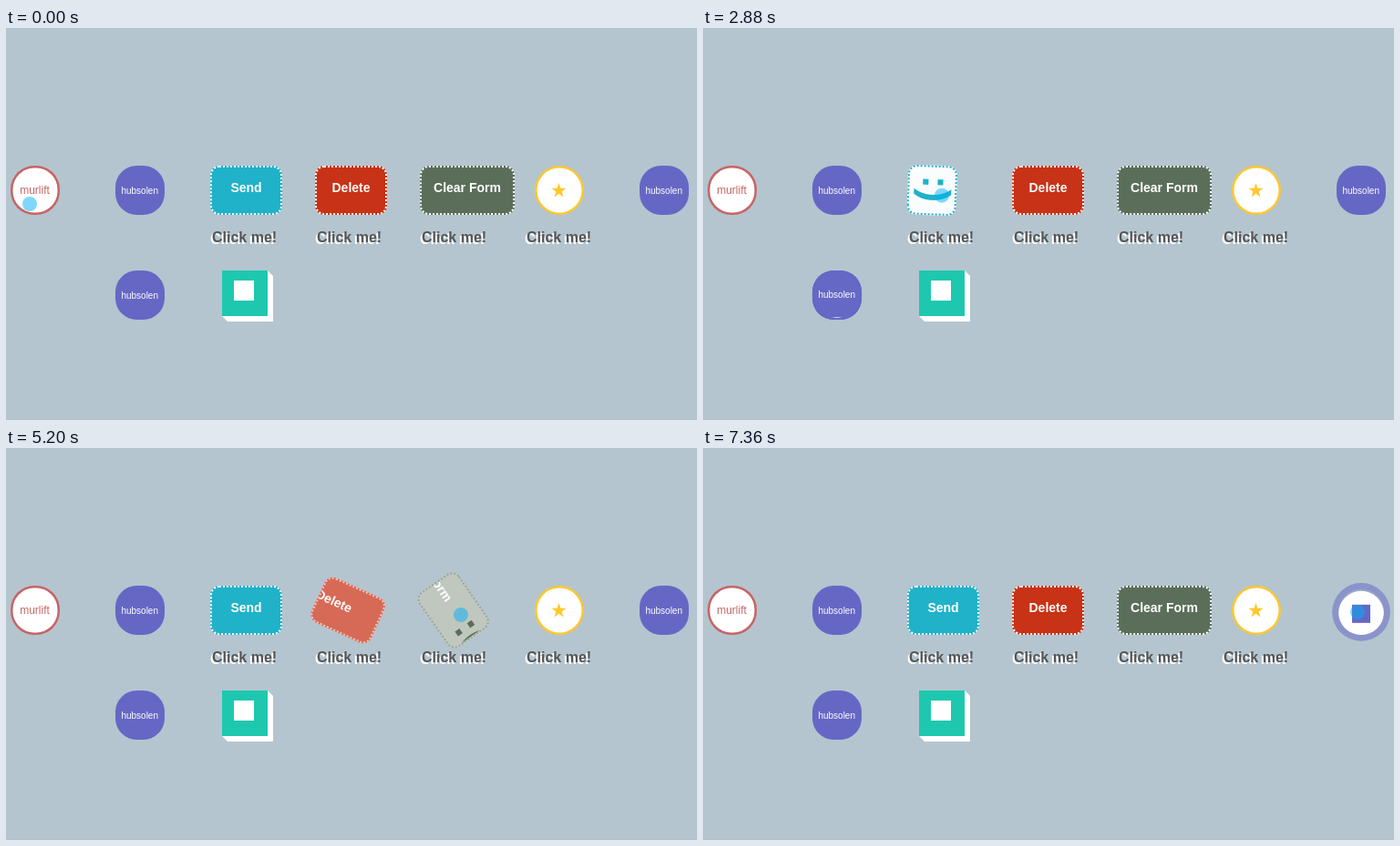
These frames come from a looping animation (758x430 px, 8560 ms). An HTML page with a canvas:

```html
<!DOCTYPE html>
<html lang="en">
<head>
<meta charset="utf-8">
<title>Button hover effects</title>
<style>
  html, body { margin: 0; width: 100%; height: 100%; overflow: hidden; background: #b4c5cf; }
  canvas { display: block; }
</style>
</head>
<body>
<canvas id="stage" width="758" height="430"></canvas>
<script>
const ctx = document.getElementById('stage').getContext('2d');
const LOOP = 8560, STEP = 80;
const SANS = '"Liberation Sans", Arial, sans-serif';
const WHITE = [255, 255, 255], PURPLE = [102, 103, 197], RED = [199, 100, 100],
      GOLD = [255, 200, 45], TEAL = [30, 200, 175];

const lerp = (a, b, p) => a + (b - a) * p;
const clamp = x => Math.max(0, Math.min(1, x));
const rgb = (c, a = 1) => `rgba(${c.map(Math.round).join()},${a})`;
const mix = (a, b, p) => a.map((v, i) => lerp(v, b[i], p));

// The CSS "ease" curve: cubic-bezier(.25, .1, .25, 1)
function ease(x) {
  if (x <= 0) return 0;
  if (x >= 1) return 1;
  let lo = 0, hi = 1, u = 0.5;
  for (let i = 0; i < 20; i++) {
    u = (lo + hi) / 2;
    const bx = 0.75 * u * (1 - u) + u ** 3;
    if (bx < x) lo = u; else hi = u;
  }
  return 0.3 * u * (1 - u) ** 2 + 3 * u * u * (1 - u) + u ** 3;
}

// Hover amount: rises after `enter`, falls after `leave`
const hover = (t, enter, leave, inMs = 600, outMs = inMs) =>
  t < leave ? ease((t - enter) / inMs) : 1 - ease((t - leave) / outMs);

function text(str, x, y, size, color, align = 'center', weight = '') {
  ctx.font = `${weight} ${size}px ${SANS}`;
  ctx.textAlign = align;
  ctx.fillStyle = color;
  ctx.fillText(str, x, y);
}

function box(x, y, w, h, r) {
  ctx.beginPath();
  ctx.roundRect(x, y, w, h, r);
}

function fillBox(x, y, w, h, r, color) {
  box(x, y, w, h, r);
  ctx.fillStyle = color;
  ctx.fill();
}

function disc(x, y, r, color) {
  ctx.beginPath();
  ctx.arc(x, y, r, 0, Math.PI * 2);
  ctx.fillStyle = color;
  ctx.fill();
}

function square(x, y, size, color) {
  ctx.fillStyle = color;
  ctx.fillRect(x - size / 2, y - size / 2, size, size);
}

function polygon(points, color) {
  ctx.beginPath();
  points.forEach(([x, y]) => ctx.lineTo(x, y));
  ctx.fillStyle = color;
  ctx.fill();
}

// Round button that widens into a bar
function pill(x, w, r, color, p) {
  fillBox(x, 151, w, 54, r, rgb(color));
  fillBox(x + 2.5, 153.5, w - 5, 49, Math.max(r - 2.5, 0), rgb(mix(WHITE, color, p)));
}

function followButton(p) {
  pill(lerp(5, -3, p), lerp(54, 155, p), lerp(26, 10, p), RED, p);
  text('murlift', 31.5, 182, 12, rgb(RED, 1 - p));
  text('Follow us on murlift', 22, 182, 12, rgb(WHITE, p), 'left');
}

function starButton(p, q) {
  const x = lerp(580, 569, p), w = lerp(54, 171, p), r = lerp(27, 11, p);
  if (p > 0) fillBox(x - 2, 153, w, 54, r, rgb([51, 51, 51], p));
  pill(x, w, r, GOLD, p);
  const points = Array.from({ length: 10 }, (_, i) => {
    const a = -Math.PI / 2 + i * Math.PI / 5, len = i % 2 ? 3.3 : 8.5;
    return [606.5 + len * Math.cos(a), 178.5 + len * Math.sin(a)];
  });
  polygon(points, rgb(GOLD, 1 - p));
  if (p > 0) {
    ctx.save();
    box(x, 151, w, 54, r);
    ctx.clip();
    text('You are a star!', lerp(723, 604, q), 183, 15, '#fff', 'left', 'bold');
    ctx.restore();
  }
}

// Label slides up, white badge slides in, border grows and fades
function socialButton(cx, cy, drift, p) {
  const y = cy + drift * p, half = 27 + 5 * p;
  const alpha = p ? Math.min(1 - 0.65 * p, (1 - p) * 8) : 1;
  const fill = rgb(PURPLE, alpha);
  fillBox(cx - half, y - half, half * 2, half * 2, half * lerp(0.87, 1, p), fill);
  if (p > 0) {
    box(cx - half, y - half, half * 2, half * 2, half * lerp(0.87, 1, p));
    ctx.roundRect(cx - 25, y - 25, 50, 50, lerp(22, 25, p));
    ctx.fillStyle = fill;
    ctx.fill('evenodd');
  }
  ctx.save();
  box(cx - 25, y - 25, 50, 50, lerp(22, 25, p));
  ctx.clip();
  text('hubsolen', cx - 0.3, y + 4 - 50 * p, 10, '#fff');
  const by = y + 50 * (1 - p);
  if (p > 0) {
    disc(cx, by, 25, '#fff');
    square(cx, by, 20, rgb(PURPLE));
  }
  ctx.restore();
}

// Dotted button that turns a quarter and shows a face
function formButton(x, width, label, face, color, turn, p) {
  const w = lerp(width, 54, p);
  ctx.save();
  ctx.translate(x + w / 2, 178);
  ctx.rotate(turn * p * Math.PI / 2);
  ctx.translate(-w / 2, 0);
  fillBox(0, -27, w, 54, 10, rgb(mix(color, WHITE, p)));
  ctx.save();
  box(2, -25, w - 4, 50, 8);
  ctx.clip();
  text(label, width / 2 - width * p, 2, 14, '#fff', 'center', 'bold');
  if (p > 0) text(face, 27 + width * (1 - p), 12, 44, rgb(color), 'center', 'bold');
  ctx.restore();
  box(1, -26, w - 2, 52, 9);
  ctx.setLineDash([2, 2]);
  ctx.lineWidth = 2;
  ctx.strokeStyle = rgb(mix(WHITE, color, p));
  ctx.stroke();
  ctx.restore();
}

function blockButton(p) {
  polygon([[237, 266], [287, 266], [293, 272], [293, 322], [243, 322], [237, 316]], '#fff');
  ctx.fillStyle = rgb(mix(TEAL, WHITE, p));
  ctx.fillRect(237, 266, 50, 50);
  square(261, 288, 22, rgb(mix(WHITE, TEAL, p)));
}

// Pointer stops: time, x, y
const PATH = [
  [240, 26, 193], [560, 62, 188], [960, 103, 183], [1160, 128, 180], [1440, 147, 178],
  [1640, 147, 182], [1860, 147, 270], [2000, 145, 287], [2160, 145, 287], [2520, 262, 180],
  [2960, 262, 184], [3280, 266, 290], [3600, 269, 314], [3840, 269, 314], [4240, 368, 184],
  [4880, 372, 182], [5200, 499, 183], [5520, 492, 182], [5840, 592, 182], [6080, 619, 181],
  [6480, 640, 190], [6680, 660, 222], [7080, 698, 212], [7320, 718, 180]
];

function pointer(t) {
  const next = PATH.findIndex(k => k[0] > t);
  if (next === 0) return PATH[0].slice(1);
  if (next < 0) return PATH[PATH.length - 1].slice(1);
  const a = PATH[next - 1], b = PATH[next];
  const u = clamp((t - a[0]) / (b[0] - a[0])), s = u * u * (3 - 2 * u);
  return [lerp(a[1], b[1], s), lerp(a[2], b[2], s)];
}

function draw(t) {
  ctx.fillStyle = '#b4c5cf';
  ctx.fillRect(0, 0, 758, 430);
  ctx.fillStyle = '#b9bfc5';
  ctx.fillRect(0, 429, 758, 1);

  for (let x = 226; x < 600; x += 115) {
    text('Click me!', x - 2, 237, 16, '#fff', 'left', 'bold');
    text('Click me!', x, 235, 16, '#555', 'left', 'bold');
  }
  followButton(hover(t, 260, 1130, 500));
  socialButton(147, 178, 2, hover(t, 1130, 1776, 250, 800));
  socialButton(147, 293, -2, hover(t, 1830, 2200, 250, 800));
  formButton(224, 79, 'Send', '(:', [32, 178, 200], -1, hover(t, 2400, 3096));
  formButton(339, 79, 'Delete', ':(', [200, 50, 22], 1, hover(t, 4160, 4940));
  formButton(454, 104, 'Clear Form', ':(', [91, 110, 90], 1, hover(t, 4987, 5612));
  blockButton(hover(t, 3140, 3960, 400));
  starButton(hover(t, 5840, 6600, 240, 600), hover(t, 5840, 6600));
  socialButton(722, 178, 2, hover(t, 7172, LOOP, 250, 800));
  disc(...pointer(t), 8, 'rgba(0,176,245,.5)');
}

function tick() {
  const t = performance.now() % LOOP;
  draw(Math.min(Math.floor(t / STEP) * STEP, 7360));
  requestAnimationFrame(tick);
}
tick();
</script>
</body>
</html>
```
